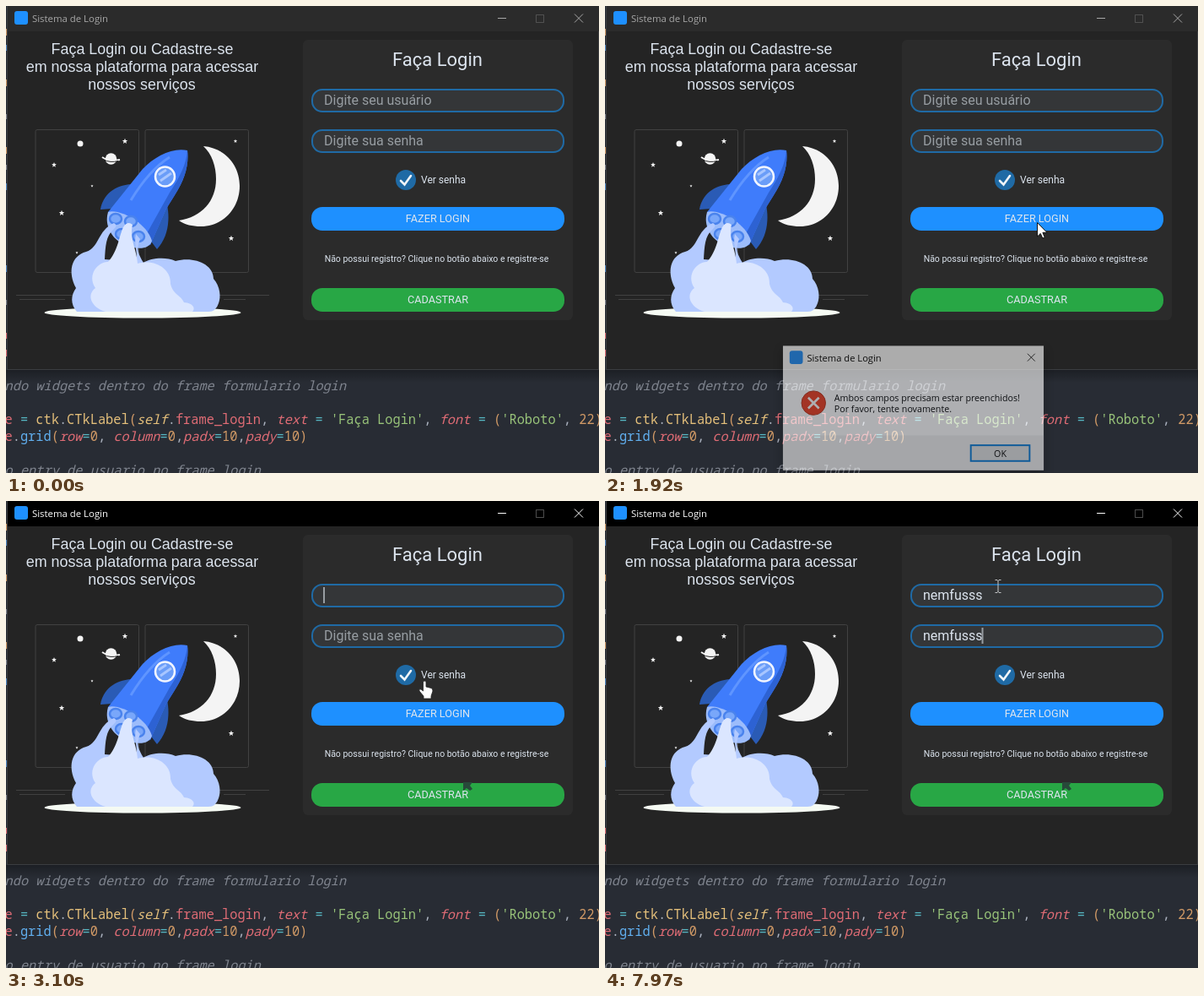
Animation of 703x553 px, one loop 8000 ms. Source, as an HTML page:

```html
<!DOCTYPE html>
<html lang="pt-BR">
<head>
<meta charset="utf-8">
<title>Sistema de Login</title>
<style>
html, body { margin: 0; width: 100%; height: 100%; overflow: hidden; background: #282c34; }
svg { display: block; font-family: Roboto, sans-serif; }
text { white-space: pre; }
.code { font: 500 15.33px "Noto Sans Mono", monospace; fill: #abb2bf; }
.ui { font-family: "Open Sans", sans-serif; }
.big { font: 17.9px "Liberation Sans", Arial, sans-serif; }
.mid { text-anchor: middle; }
.light { fill: #dce4ee; }
.i { font-style: italic; }
.r { fill: #e06c75; } .y { fill: #e5c07b; } .g { fill: #98c379; } .o { fill: #d19a66; } .c { fill: #56b6c2; } .b { fill: #61afef; } .n { fill: #7f848e; }
.entry { fill: #343638; stroke: #1f6aa5; stroke-width: 2; }
.caret { fill: #979da2; }
</style>
</head>
<body>
<svg width="703" height="553" viewBox="0 0 703 553">
  <defs>
    <path id="star" d="M0-3.2L.9-1H3.2L1.4.5 2 3 0 1.6-2 3-1.4.5-3.2-1H-.9Z" fill="#f4f4f4"/>
    <filter id="blur" x="-20%" y="-20%" width="140%" height="140%"><feGaussianBlur stdDeviation="6"/></filter>
    <linearGradient id="shade" x2="0" y2="1"><stop stop-opacity=".3"/><stop offset="1" stop-opacity="0"/></linearGradient>
  </defs>

  <!-- editor -->
  <rect width="703" height="553" fill="#282c34"/>
  <rect y="431" width="703" height="15" fill="url(#shade)"/>
  <g class="code">
    <text x="-1.5" y="455" class="i n">ndo widgets dentro do frame formulario login</text>
    <text x="-1.5" y="495"><tspan class="r">e</tspan> <tspan class="c">=</tspan> <tspan class="y">ctk</tspan>.<tspan class="y">CTkLabel</tspan><tspan class="o">(</tspan><tspan class="y i">self</tspan>.<tspan class="r">frame_login</tspan>, <tspan class="r i">text</tspan> <tspan class="c">=</tspan> <tspan class="g">'Faça Login'</tspan>, <tspan class="r i">font</tspan> <tspan class="c">=</tspan> <tspan class="o">(</tspan><tspan class="g">'Roboto'</tspan>, <tspan class="o">22)</tspan></text>
    <text x="-1.5" y="515"><tspan class="r">e</tspan>.<tspan class="b">grid</tspan><tspan class="o">(</tspan><tspan class="r i">row</tspan><tspan class="c">=</tspan><tspan class="o">0</tspan>, <tspan class="r i">column</tspan><tspan class="c">=</tspan><tspan class="o">0</tspan>,<tspan class="r i">padx</tspan><tspan class="c">=</tspan><tspan class="o">10</tspan>,<tspan class="r i">pady</tspan><tspan class="c">=</tspan><tspan class="o">10)</tspan></text>
    <text x="-1.5" y="555" class="i n">o entry de usuario no frame login</text>
  </g>
  <g stroke-width="2" fill="none">
    <path stroke="#d19a66" d="M0 27v8M0 87v8M0 167v8"/>
    <path stroke="#4d86c4" d="M0 46v7M0 210v8M0 307v8"/>
    <path stroke="#7f848e" d="M0 128v6M0 188v6M0 348v6"/>
    <path stroke="#e06c75" d="M0 387v7M0 407v8"/>
  </g>

  <!-- main window -->
  <rect x="1" width="702" height="431" fill="#3b3d40"/>
  <rect x="2" y="30" width="700" height="400" fill="#242424"/>
  <rect id="bar" x="2" width="701" height="30"/>
  <rect x="10" y="6" width="16" height="16" rx="3" fill="#1e90ff"/>
  <text id="caption" class="ui" x="31" y="19" font-size="11.38">Sistema de Login</text>
  <g id="controls" fill="none">
    <path d="M583 14.5h10M674 9.5l10 10m0-10l-10 10"/>
    <path d="M628.5 10.5h9v9h-9z" opacity=".3"/>
  </g>

  <g class="big light mid">
    <text x="161.5" y="57">Faça Login ou Cadastre-se</text>
    <text x="161.5" y="78">em nossa plataforma para acessar</text>
    <text x="161" y="99">nossos serviços</text>
  </g>

  <!-- illustration -->
  <g fill="none" stroke="#414141">
    <rect x="35" y="146.500" width="122.500" height="169" rx="2"/>
    <rect x="165" y="146.500" width="122.500" height="169" rx="2"/>
    <path d="M12 342.500H312M16 347.500H70M258 347.500H284"/>
  </g>
  <g fill="#f4f4f4">
    <circle cx="88" cy="163" r="3.500"/>
    <circle cx="124.500" cy="181" r="6.800"/>
    <path d="M114 179q9 6 21 3" fill="none" stroke="#f4f4f4" stroke-width="2"/>
    <path d="M115 182q9 4 18 1.500" fill="none" stroke="#242424"/>
    <path d="M234 166C259 168 277 188 277 213C277 240 257 261 231 261C221 261 212 259 205 254C232 250 249 231 249 205C249 190 244 175 234 166Z"/>
  </g>
  <g id="stars"></g>
  <ellipse cx="162" cy="363" rx="116.500" ry="6.500" fill="#f5faf3"/>
  <path fill="#2a5bb5" d="M149 211C128 212 115 224 112 241L126 240ZM191 235C195 256 191 275 179 288L170 276Z"/>
  <path fill="#3f7cfb" d="M215 171C198 167 176 178 162 193L121 244C124 266 150 284 171 283L190 240L200 224C212 206 217 188 215 171Z"/>
  <path fill="#2d62d3" d="M215 171C214 188 205 204 194 221L161 280Q167 284 171 283L190 240L200 224C212 206 217 188 215 171Z"/>
  <path d="M194 179Q170 194 148 230" fill="none" stroke="#5f95ff" stroke-width="3"/>
  <circle cx="188.500" cy="202" r="11.500" fill="#6a9df8" stroke="#f1f5ff" stroke-width="2.500"/>
  <path d="M181 200l9-6M183 207l13-9" stroke="#a8c6ff" stroke-width="3"/>
  <path fill="#9cbcfb" d="M121 244C133 240 166 255 173 278C170 288 158 288 146 285C126 279 116 260 121 244Z"/>
  <g fill="#79a7fa" stroke="#4a83ed" stroke-width="2.500">
    <ellipse cx="130" cy="252" rx="7" ry="6"/><ellipse cx="148" cy="255" rx="7" ry="6"/>
    <ellipse cx="157" cy="273" rx="7" ry="6"/><ellipse cx="137" cy="270" rx="7" ry="6"/>
  </g>
  <path fill="#b3caff" d="M84 362C76 353 77 342 83 334C73 315 77 296 95 291C111 286 108 266 128 257Q133 260 128 264C118 272 118 285 117 300L154 303C157 293 151 281 154 270L159 276C154 288 157 294 163 304C172 298 190 297 201 302C222 296 246 305 246 323C254 332 255 345 252 352Q249 362 240 362Z"/>
  <path fill="#dbe6ff" d="M118 362C101 357 95 342 106 334C95 317 111 302 121 303C133 290 134 272 139 262Q144 254 150 259C146 275 155 288 156 305C176 299 196 311 195 329C198 342 207 342 211 351C222 352 225 358 221 362Z"/>

  <!-- form -->
  <rect x="352" y="40" width="320" height="332" rx="6" fill="#2b2b2b"/>
  <text class="mid light" x="511.500" y="71" font-size="22">Faça Login</text>
  <rect class="entry" x="363" y="99" width="298" height="26" rx="12"/>
  <rect class="entry" x="363" y="147" width="298" height="26" rx="12"/>
  <text id="user" x="377" y="117" font-size="16"></text>
  <text id="pass" x="377" y="165" font-size="16"></text>
  <rect id="userCaret" class="caret" y="102" width="2" height="19"/>
  <rect id="passCaret" class="caret" y="150" width="2" height="19"/>
  <circle cx="474" cy="206" r="12" fill="#1f6aa5"/>
  <path d="M468 207l4.500 4.500L480 201" fill="none" stroke="#f0f4f8" stroke-width="2.600" stroke-linecap="round"/>
  <text class="light" x="492" y="210" font-size="12">Ver senha</text>
  <rect id="login" x="362" y="238" width="300" height="28" rx="13"/>
  <rect x="362" y="334" width="300" height="28" rx="13" fill="#28a745"/>
  <path id="smudge" d="M542 333h11l-3 4 3 4-3 2-4-3-4 3z" fill="#27493a"/>
  <g class="mid light">
    <text x="512" y="256" font-size="12.7">FAZER LOGIN</text>
    <text x="510.500" y="303" font-size="10.5">Não possui registro? Clique no botão abaixo e registre-se</text>
    <text x="512" y="352" font-size="12.7">CADASTRAR</text>
  </g>

  <!-- message box -->
  <g id="dialog">
    <rect x="207" y="405" width="317" height="152" filter="url(#blur)" opacity=".4"/>
    <rect x="208" y="401" width="315" height="150" fill="#fff"/>
    <rect x="208" y="509" width="315" height="42" fill="#f0f0f0"/>
    <rect id="closeHot" x="492" y="401" width="31" height="29" fill="#f4a6ad"/>
    <path d="M503.500 410.500l9 9m0-9l-9 9" stroke="#222" fill="none"/>
    <rect x="216" y="407" width="16" height="16" rx="3" fill="#1e90ff"/>
    <circle cx="245" cy="470" r="14.500" fill="#ee3a1c" stroke="#b92c14"/>
    <path d="M238.500 463.500l13 13m0-13l-13 13" stroke="#fff" stroke-width="2.600"/>
    <rect id="ok" x="435" y="521" width="71" height="19" stroke="#0078d7" stroke-width="2"/>
    <g class="ui">
      <text x="237" y="420" font-size="11.38">Sistema de Login</text>
      <g font-size="10.9">
        <text x="270" y="468">Ambos campos precisam estar preenchidos!</text>
        <text x="270" y="481">Por favor, tente novamente.</text>
        <text x="470.500" y="535" class="mid">OK</text>
      </g>
    </g>
  </g>

  <!-- pointers, each with its hot spot at 0,0 -->
  <g id="pointer">
    <path id="arrow" d="M.5.5V17L4.300 13.400 6.800 19 9.300 18 6.900 12.300H12Z" fill="#fff" stroke="#111"/>
    <path id="hand" d="M-1.500 1Q0-1 2 1V7L8 8.500Q10 9 10 12L8 18V21H-1V18L-6 12Q-7 9-4 10L-1.500 12Z" fill="#fff" stroke="#222" stroke-width=".8"/>
    <path id="beam" d="M-3.500-7.500h2.500l1 1 1-1h2.500M0-7V7M-3.500 7.500h2.500l1-1 1 1h2.500" fill="none" stroke="#c4c6c8"/>
  </g>
</svg>
<script>
const LOOP = 8000, WORD = 'nemfusss';
const $ = id => document.getElementById(id);
const set = (id, attrs) => { for (const k in attrs) $(id).setAttribute(k, attrs[k]); };
const show = (id, on) => set(id, { visibility: on ? 'inherit' : 'hidden' });
const clamp = v => Math.max(0, Math.min(1, v));

$('stars').innerHTML = [[141, 160, 1], [57, 188, .9], [66, 245, 1], [267, 275, 1], [102, 213, .5], [84, 292, .5], [272, 160, .7]]
  .map(([x, y, s]) => `<use href="#star" transform="translate(${x} ${y}) scale(${s})"/>`).join('');

// pointer way points: time, x, y
const PATH = [
  [210, 588, 433], [580, 457, 112], [950, 528, 302], [1020, 528, 302], [1300, 510, 123],
  [1580, 512, 256], [1940, 512, 256], [2110, 542, 333], [2190, 508, 412], [2270, 489, 478],
  [2500, 470, 529], [2800, 470, 529], [3100, 496, 213], [3360, 478, 106], [3500, 475, 95], [3640, 466, 101]
];

function pointerAt(t) {
  const i = PATH.findIndex(p => p[0] > t);
  if (i < 1) return PATH[i < 0 ? PATH.length - 1 : 0].slice(1);
  const [t0, x0, y0] = PATH[i - 1], [t1, x1, y1] = PATH[i];
  const k = (t - t0) / (t1 - t0);
  return [x0 + (x1 - x0) * k, y0 + (y1 - y0) * k];
}

// six letters in rhythm, then two more after a pause
function typed(t, start, gap, late) {
  const n = Math.min(6, Math.floor((t - start) / gap) + 1) + (t >= late) + (t >= late + 130);
  return WORD.slice(0, Math.max(0, n));
}

function entry(id, hint, t, focus, blur, blink, word) {
  const el = $(id), focused = t >= focus;
  const text = focused ? word : hint;
  if (el.textContent !== text) el.textContent = text;
  el.setAttribute('fill', focused ? '#dce4ee' : '#979da2');
  const on = t < blink || (t - blink) % 900 < 600;
  show(id + 'Caret', focused && t < blur && on);
  set(id + 'Caret', { x: 376 + (text && focused ? el.getComputedTextLength() : 0) });
}

function draw(t) {
  const [x, y] = pointerAt(t);
  const active = t >= 2900;
  set('bar', { fill: active ? '#000' : '#2b2b2b' });
  set('caption', { fill: active ? '#fff' : '#a8a8a8' });
  set('controls', { stroke: active ? '#fff' : '#a8a8a8' });

  entry('user', 'Digite seu usuário', t, 2900, 5690, 2940, typed(t, 4110, 110, 5030));
  entry('pass', 'Digite sua senha', t, 5690, LOOP, 5690, typed(t, 6910, 100, 7840));

  const hot = t >= 1020 && t < 1780 && y >= 238 && y < 266;
  set('login', { fill: hot ? '#144870' : '#1e90ff' });
  show('smudge', t >= 2180);

  const a = clamp((t - 1790) / 210) * clamp((2950 - t) / 150);
  const s = .95 + .05 * a;
  set('dialog', { opacity: a, transform: `translate(365.5 476) scale(${s}) translate(-365.5 -476)` });
  show('closeHot', t >= 2170 && t < 2340);
  set('ok', { fill: t >= 2440 ? '#e5f1fb' : '#e1e1e1' });

  const hand = hot || (active && y >= 194 && y < 218);
  const beam = active && y < 126;
  show('pointer', t >= 210);
  show('hand', hand);
  show('beam', beam);
  show('arrow', !hand && !beam);
  set('pointer', { transform: `translate(${Math.round(x)} ${Math.round(y)})` });
}

const begin = performance.now();
function tick() {
  draw((performance.now() - begin) % LOOP);
  requestAnimationFrame(tick);
}
tick();
</script>
</body>
</html>
```
